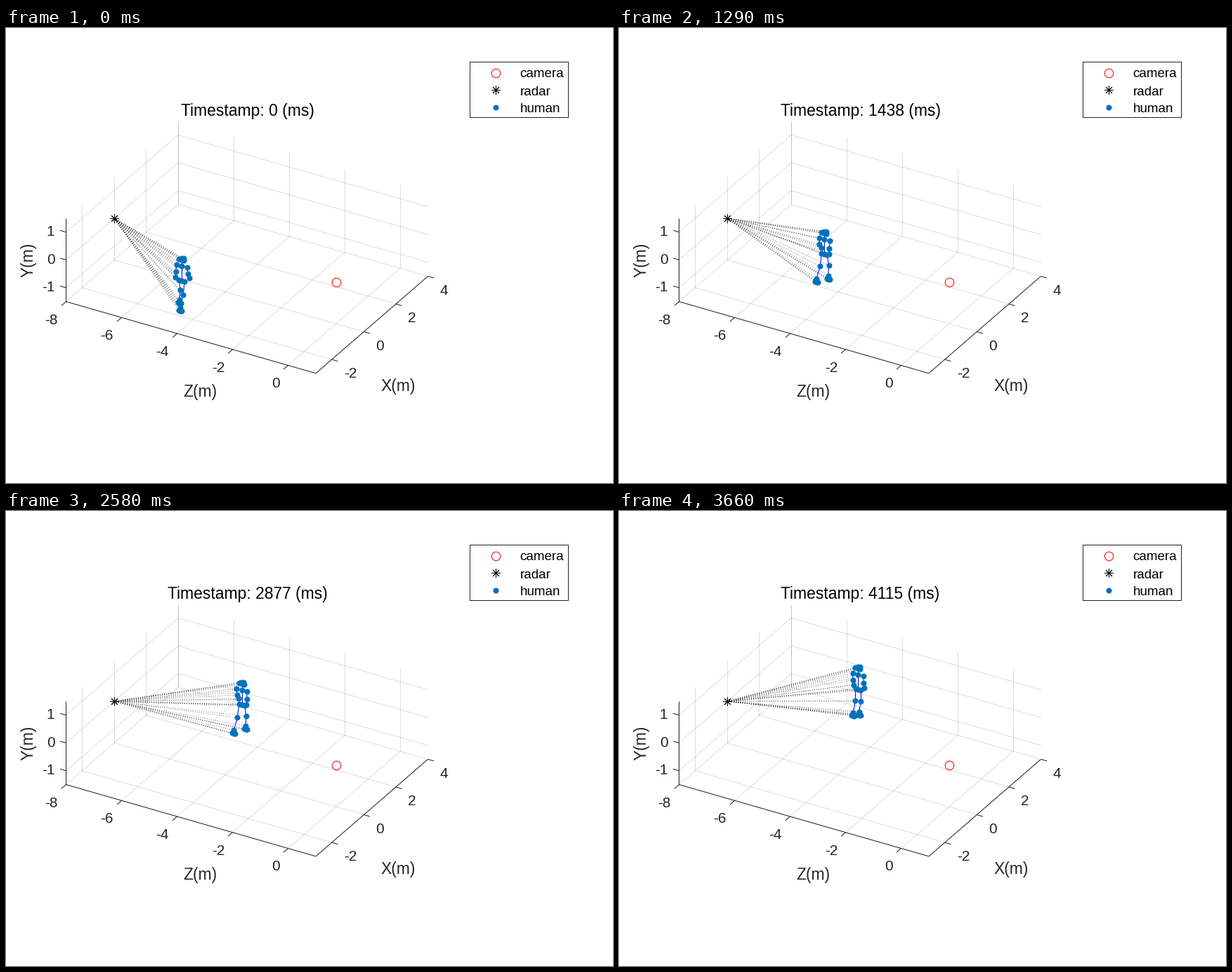
Recreate the animation shown at these times as a matplotlib script. Size 864x648 px, loop 3690 ms.

```python
import numpy as np
import matplotlib.pyplot as plt
from matplotlib.animation import FuncAnimation
from matplotlib.collections import LineCollection

W, H, DPI = 864, 648, 150
FRAMES, INTERVAL = 123, 30
INK = "#262626"
BLUE = "#0072bd"
LW = 0.5

plt.rcParams["font.family"] = "Liberation Sans"
plt.rcParams["axes.unicode_minus"] = False

fig = plt.figure(figsize=(W / DPI, H / DPI), dpi=DPI, facecolor="white")
ax = fig.add_axes([0, 0, 1, 1])
# pixel centres are counted from one
ax.set_xlim(0.5, W + 0.5)
ax.set_ylim(H + 0.5, 0.5)
ax.axis("off")

# screen direction of one metre along each axis
ORIGIN = np.array([470.4, 362.3])
SIDE, FORWARD, UP = np.array([[39.5, 11.35], [22.8, -19.75], [0, -39.6]])


def project(z, x, y):
    """World metres to stage pixels."""
    return ORIGIN + z * SIDE + x * FORWARD + y * UP


def stroke(points, **style):
    ax.plot(*zip(*points), lw=LW, solid_capstyle="butt", **style)


def label(x, y, text, size=10, ha="center", color=INK, rotation=0):
    return ax.text(x, y, text, size=size, ha=ha, va="baseline", color=color,
                   rotation=rotation, rotation_mode="anchor")


# --- axes box and grid ---
Z0, Z1, X0, X1, Y0, Y1 = -8, 1, -3, 4, -1.5, 1.5


def grid(*points):
    stroke([project(*p) for p in points], color=INK, alpha=0.15, zorder=1)


def axis_line(a, b):
    stroke([project(*a), project(*b)], color=INK, zorder=2)


def tick(at, dx, dy):
    x, y = project(*at)
    stroke([(x, y), (x + dx, y + dy)], color=INK, zorder=2)
    return x, y


for z in range(-8, 1, 2):
    grid((z, X0, Y0), (z, X1, Y0))
    grid((z, X1, Y0), (z, X1, Y1))
    x, y = tick((z, X0, Y0), -6.5, 5.7)
    label(x - 11.5, y + 32, z, ha="right")
for v in range(-2, 5, 2):
    grid((Z0, v, Y0), (Z1, v, Y0))
    grid((Z0, v, Y0), (Z0, v, Y1))
    x, y = tick((Z1, v, Y0), 8.5, 2.5)
    label(x + 17, y + 26.3, v, ha="left")
for v in (-1, 0, 1):
    grid((Z0, X0, v), (Z0, X1, v))
    grid((Z0, X1, v), (Z1, X1, v))
    x, y = tick((Z0, X0, v), -8.5, -2.4)
    label(x - 16, y + 5.5, v, ha="right")

axis_line((Z0, X0, Y0), (Z1, X0, Y0))
axis_line((Z1, X0, Y0), (Z1, X1, Y0))
axis_line((Z0, X0, Y0), (Z0, X0, Y1))

label(277, 525, "Z(m)", 11)
label(559, 517, "X(m)", 11)
label(39.5, 331, "Y(m)", 11, rotation=90)
title = label(344, 126, "", 11, color="black")

# --- sensors and legend ---
CAMERA = dict(marker="o", ms=6, mfc="none", mec="red", mew=LW, ls="")
RADAR = dict(marker=(8, 2, 0), ms=6, color="black", mew=0.45, ls="")
HUMAN = dict(marker="o", ms=3.9, color=BLUE, mew=0, ls="")

radar_at = project(-8, 0, 0)
ax.plot(*project(0, 0, 0), zorder=6, **CAMERA)
ax.plot(*radar_at, zorder=6, **RADAR)

stroke([(660, 48), (800, 48), (800, 127.5), (660, 127.5), (660, 48)],
       color=INK)
for i, (name, style) in enumerate(
        (("camera", CAMERA), ("radar", RADAR), ("human", HUMAN))):
    ax.plot(697, 64 + 24.7 * i, **style)
    label(732, 71 + 25 * i, name, 9, ha="left", color="black")

# --- walker ---
KEY_FRAMES = [0, 14, 33, 54, 86, 106, 122]
KEY_X = [-2.35, -2.08, -0.9, 0.09, 1.81, 2.47, 2.69]
STRIDE = 1.147

FACE = [(-4, 0), (-0.5, -1.5), (2.5, -1), (3, 2), (0, 1)]
FOOT = [(-2, 4), (0.5, 5), (2, 5)]


def position(frame):
    """Pelvis on the ground plane: veers off slowly while walking along X."""
    x = np.interp(frame + np.arange(-4, 5), KEY_FRAMES, KEY_X).mean()
    return -4.22 - 0.6 * (frame / 122) ** 3, x


def skeleton(frame):
    """Joints and the bones between them, in pixels."""
    z, x = position(frame)
    pelvis = project(z, x, 0)
    phase = 2 * np.pi * (x - 1.81) / STRIDE

    def joint(side, forward, up):
        return pelvis + side * SIDE + forward * FORWARD + up * UP

    neck, head = joint(0, 0, 0.54), joint(0, 0, 0.78)
    points = [pelvis, neck] + [head + o for o in FACE]
    bones = [(pelvis, neck), (neck, head)]

    for s in (-1, 1):
        swing = s * np.cos(phase)
        lift = 0.08 * max(0, -s * np.sin(phase))
        arm = [joint(0.19 * s, 0, 0.53),
               joint(0.2 * s, -0.04 * swing, 0.28),
               joint(0.2 * s, 0.04 - 0.12 * swing, 0.09)]
        leg = [joint(0.1 * s, 0, 0),
               joint(0.1 * s, 0.1 * swing, -0.43 + lift / 2),
               joint(0.1 * s, -0.13 + 0.2 * swing, -0.78 + lift)]
        toes = [leg[-1] + o for o in FOOT]
        points += arm + leg + toes
        for chain in ([neck] + arm, [pelvis] + leg):
            bones += zip(chain, chain[1:])
        bones += [(leg[-1], t) for t in toes]
    return points, bones


rays = LineCollection([], colors=INK, alpha=0.55, linewidths=LW,
                      linestyles=[(0, (1, 2))], zorder=3)
limbs = LineCollection([], colors="blue", linewidths=LW, zorder=4)
ax.add_collection(rays, autolim=False)
ax.add_collection(limbs, autolim=False)
dots, = ax.plot([], [], zorder=5, **HUMAN)


def draw(frame):
    points, bones = skeleton(frame)
    dots.set_data(*np.transpose(points))
    limbs.set_segments(bones)
    rays.set_segments([[radar_at, p] for p in points])
    sample = frame + (frame >= 115)
    title.set_text(f"Timestamp: {round(33.452 * sample)} (ms)")
    return dots, limbs, rays, title


anim = FuncAnimation(fig, draw, frames=FRAMES, interval=INTERVAL,
                     repeat=True, repeat_delay=0)
plt.show()
```
